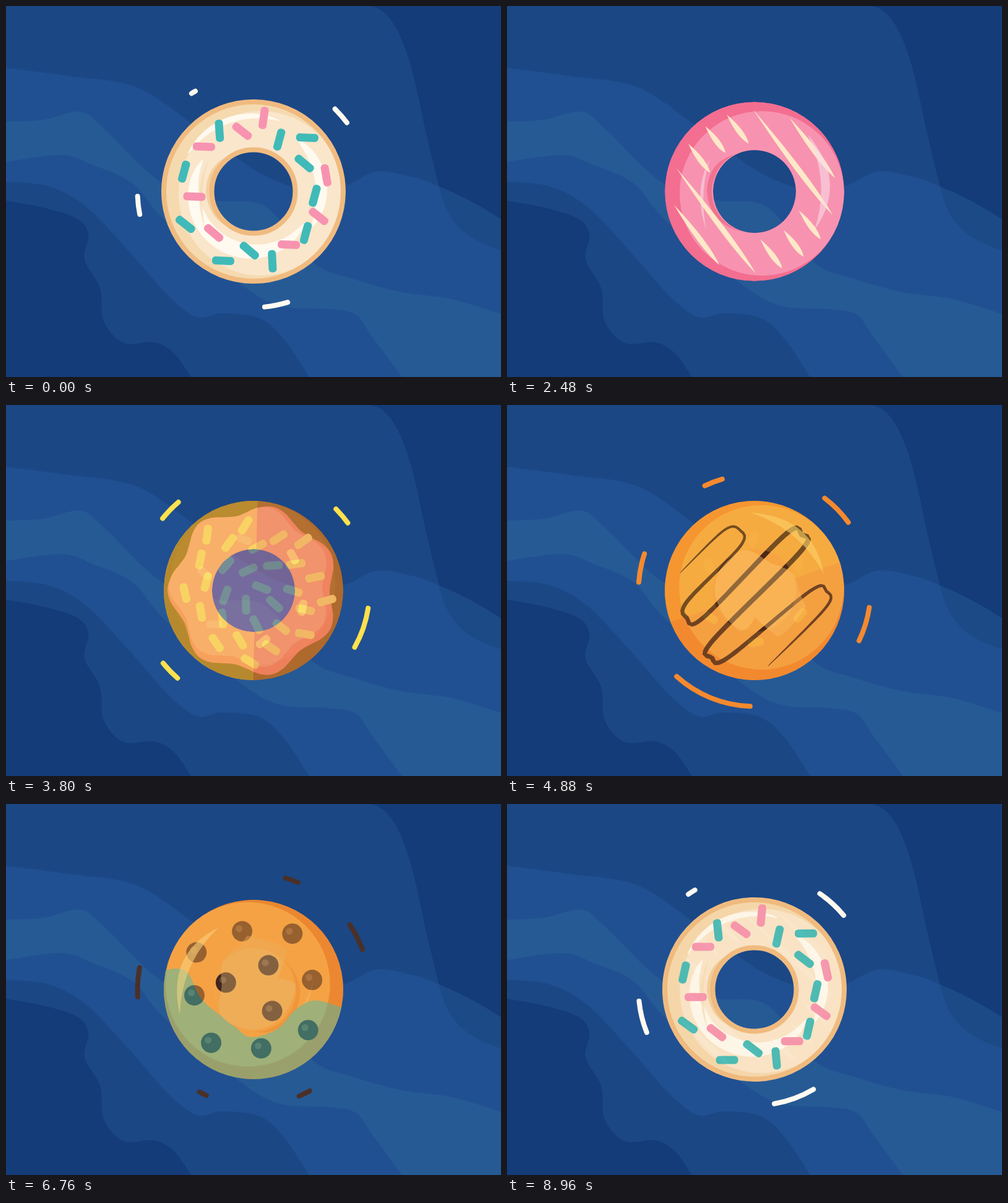
Recreate the animation shown at these times as an HTML page. Size 800 by 600 pixels, loop 9 s.

```html
<!DOCTYPE html>
<html lang="en">
<head>
<meta charset="utf-8">
<title>Donuts</title>
<style>
html, body { margin: 0; width: 100%; height: 100%; overflow: hidden; background: #1b4785; }
svg { display: block; width: 800px; height: 600px; }
</style>
</head>
<body>
<svg viewBox="0 0 800 600">
  <defs><clipPath id="ring"><path clip-rule="evenodd" d="M255 300a145 145 0 1 0 290 0a145 145 0 1 0 -290 0M333 300a67 67 0 1 0 134 0a67 67 0 1 0 -134 0"/></clipPath></defs>
  <g id="back"></g>
  <g id="stage"></g>
  <path id="arcs" fill="none" stroke-width="8" stroke-linecap="round"/>
</svg>
<script>
const $ = id => document.getElementById(id);
const range = (n, f) => Array.from({ length: n }, (_, i) => f(i));
const polar = (r, deg, cx = 400, cy = 300) => {
  const a = deg * Math.PI / 180;
  return [cx + r * Math.cos(a), cy + r * Math.sin(a)];
};

// Smooth path through points, given as pairs or as a flat list.
function curve(points, closed) {
  const flat = points.flat(), n = flat.length / 2;
  const at = i => {
    i = closed ? (i + n) % n : Math.max(0, Math.min(n - 1, i));
    return [flat[2 * i], flat[2 * i + 1]];
  };
  let d = 'M' + at(0);
  for (let i = 0; i < (closed ? n : n - 1); i++) {
    const [a, b, c, e] = [at(i - 1), at(i), at(i + 1), at(i + 2)];
    const c1 = b.map((v, j) => v + (c[j] - a[j]) / 6);
    const c2 = c.map((v, j) => v - (e[j] - b[j]) / 6);
    d += `C${c1} ${c2} ${c}`;
  }
  return d + (closed ? 'Z' : '');
}

const path = (d, fill, opacity = 1) => `<path d="${d}" fill="${fill}" opacity="${opacity}"/>`;
const circle = (x, y, r, fill, more = '') => `<circle cx="${x}" cy="${y}" r="${r}" fill="${fill}" ${more}/>`;
const hoop = (r, w, color) => circle(400, 300, r, 'none', `stroke="${color}" stroke-width="${w}"`);
const turn = (deg, inner) => `<g transform="rotate(${deg} 400 300)">${inner}</g>`;
const inRing = inner => `<g clip-path="url(#ring)">${inner}</g>`;

// Dough with a crescent of shade along its left side.
const disc = (fill, shade) => circle(400, 300, 145, shade) + circle(412, 303, 133, fill);
const ring = (fill, shade) => inRing(disc(fill, shade));
const rim = (dark, light) =>
  path('M368 240Q325 252 323 300Q328 355 382 365A67 67 0 0 1 368 240Z', dark) +
  path('M328 248Q300 298 322 362Q310 300 328 248Z', light, .65);
const shine = (color, opacity = .6) => path('M486 208Q552 285 497 362Q523 285 486 208Z', color, opacity);
const glow = (color, opacity) => path('M340 335C325 270 360 235 400 235C442 228 438 262 450 285C482 328 454 330 450 372Q400 388 383 382Q376 360 374 334Q350 346 340 335Z', color, opacity);

// Line that thins out toward both ends.
function taper(points, width, power, color) {
  const line = document.createElementNS('http://www.w3.org/2000/svg', 'path');
  line.setAttribute('d', curve(points));
  const len = line.getTotalLength(), steps = 260, left = [], right = [];
  for (let i = 0; i <= steps; i++) {
    const s = i / steps, p = line.getPointAtLength(s * len);
    const a = line.getPointAtLength(s * len - 1), b = line.getPointAtLength(s * len + 1);
    const w = (.6 + width * Math.sin(Math.PI * s) ** power) / 2 / (Math.hypot(b.x - a.x, b.y - a.y) || 1);
    const dx = (a.y - b.y) * w, dy = (b.x - a.x) * w;
    left.push([p.x + dx, p.y + dy]);
    right.unshift([p.x - dx, p.y - dy]);
  }
  return path('M' + left.concat(right).join('L') + 'Z', color);
}
const swoosh = (r, from, to, width) =>
  taper(range(13, i => polar(r, from + (to - from) * i / 12)), width, .7, '#fffaf0');

const sprinkle = ([x, y], tilt, color, l = 36, w = 13) =>
  `<rect x="${-l / 2}" y="${-w / 2}" width="${l}" height="${w}" rx="5.5" fill="${color}" transform="translate(${x} ${y}) rotate(${tilt})"/>`;

// Sprinkles around the ring, alternating nearer and farther from the hole.
const tilts = [2, 86, 38, 98, 105, 2, 40, 80, 105, 38, 105, 2, 87, 40, 2, 40, 38, 2, 105];
const wreath = () => tilts.map((tilt, i) => {
  const angle = 18.56 * i - 138 - 10 * Math.max(0, Math.sin((i - 5) * .24));
  const r = 108 - 15 * (-1) ** i * Math.sin(i * Math.PI / 10);
  const isPink = i < 3 ? i % 2 === 0 : i % 2 && i % 8 !== 5;
  return sprinkle(polar(r, angle), tilt, isPink ? pink : teal);
}).join('');

const scatter = (n, color) => range(n, i =>
  sprinkle(polar(22 * Math.sqrt(i + .4), 137.5 * i - 21), 20 + i * 67, color, 32)).join('');

// Scalloped icing with seven lobes.
const icing = (r, x, y, color) =>
  path(curve(range(42, i => polar(r + 8 * Math.cos(i * Math.PI / 3), i * 360 / 42 - 78, x, y)), true), color);

// Evenly spaced parallel stripes cut to the ring, widest near their lower end.
function stripes(color) {
  const drop = (a, b, y) => {
    const m = a + (b - a) * .68;
    return `M${a} ${y}Q${m} ${y + 9} ${b} ${y}Q${m} ${y - 9} ${a} ${y}`;
  };
  const d = range(7, i => {
    const y = 39 * (i - 3), outer = Math.sqrt(132 ** 2 - y * y);
    if (Math.abs(y) > 70) return drop(-outer, outer, y);
    const inner = Math.sqrt(78 ** 2 - y * y);
    return drop(-outer, -inner, y) + drop(inner, outer, y);
  }).join('');
  return `<g transform="translate(400 300) rotate(53)">${path(d, color)}</g>`;
}

const swirl = () => taper(range(32, i => {
  const quarter = i * .3 - .4;
  return polar(17 + 12 * quarter, -90 * quarter, 401, 310);
}), 7.5, .8, brown);

// Back-and-forth line with round bends at the given centres.
function zigzag(start, bends, end) {
  const r = 13;
  const points = bends.flatMap(([x, y], i) => {
    const side = i % 2 ? -r : r;
    return [[x - r, y - r], [x + side, y - side], [x + r, y + r]];
  });
  return taper([start, ...points, end], 7.5, .6, brown);
}

const chip = ([x, y]) => circle(x, y, 16.5, '#41251f') + circle(x - 5, y - 4, 5.5, '#6b4a3c');
const chips = () => [
  ...range(8, i => polar(103 + 7 * (-1) ** i, -148 + 45.9 * i)),
  ...range(3, i => polar(46, 193 + 107.5 * i))
].map(chip).join('');

const brown = '#4a2818', cream = '#fde8c8', teal = '#40bab8', pink = '#f793b0';

const donuts = [
  { arc: '#fffaf0', art: turn(7.8,
    ring('#fae6cb', '#f5dab0') + swoosh(97, 212, 32, 25) + swoosh(110, -50, 32, 18) + swoosh(122, -150, -70, 9) +
    rim('#f3d09f', '#f5dab0') + hoop(145, 8, '#f0bb80') + hoop(67.5, 8, '#f0bb80') + wreath()) },
  { arc: '#5cded6', art: disc(teal, '#2fa398') + swirl() + glow('#68e6e2', .6) + shine('#6feae4') },
  { arc: pink, art: ring(pink, '#f36e90') + rim('#f0738f', '#fbd3e2') + stripes(cream) + shine('#fbdcea') },
  { arc: '#f36e90', art: disc('#5b3a1c', '#54351a') + turn(109,
    icing(131, 400, 300, '#f36e90') + icing(124, 395, 294, pink) + scatter(30, '#f6ee9e')) },
  { arc: '#ffe14d', art: ring('#ee9440', '#ea8c38') + turn(109,
    inRing('<rect x="240" y="140" width="163" height="320" fill="#fac23c"/>') +
    range(6, i => sprinkle(polar(84, 60 * i - 102), 40 * i + 20, '#fbd548', 26)).join('')) },
  { arc: '#f6892d', art: disc('#f6a442', '#f6892d') +
    turn(39, zigzag([279, 273], [[363, 216], [304, 332], [462, 222], [345, 396], [503, 313]], [423, 422])) +
    glow('#fcc870', .4) + turn(-7, shine('#fcd978')) },
  { arc: '#45bfae', art: ring('#f5a142', '#ee8a30') + rim('#e8892f', '#fcc870') + turn(153, inRing(path(
    curve([250, 272, 290, 272, 317, 318, 366, 356, 396, 377, 440, 363, 468, 332, 500, 316, 548, 328]) + 'V450H250Z', '#45bfae'))) +
    shine('#fcd978', .5) },
  { arc: '#4a3028', art: disc('#f4a347', '#ea8530') + turn(153, chips()) + glow('#e6bb70', .4) + shine('#fcd488') },
  { arc: '#f2c27a', art: ring('#f2c27a', '#e9b066') + rim('#e2a658', '#fbe3b4') + stripes(cream) + shine('#fbe3b4') }
];

// Each burst: start angle and sweep in degrees.
const bursts = {
  A: [[-94, 58], [10, 75], [120, 58], [-134, 14]],
  B: [[-45, 28], [-142, 35], [130.5, 32], [8, 64]],
  C: [[-63, 40], [-121, 22], [-184.5, 34], [-2, 41], [68, 95]],
  D: [[-74, 36], [-34, 76], [176.3, 80], [114, 21], [61, 32]]
};
const burstOrder = 'ACBDBCADB';

// Wavy layers, each an upper edge filled down to the bottom of the stage.
const layer = (edge, color) => path(curve(edge) + 'V600H0Z', color);
$('back').innerHTML =
  layer([0, 100, 100, 113, 210, 131, 300, 190, 355, 232, 410, 270, 465, 293, 505, 297, 550, 290, 598, 268, 650, 275, 700, 292, 800, 345], '#205092') +
  layer([0, 187, 60, 184, 120, 171, 160, 200, 250, 285, 335, 314, 420, 325, 495, 414, 560, 441, 640, 463, 720, 474, 800, 498], '#265a95') +
  layer([0, 252, 90, 241, 140, 257, 205, 287, 255, 345, 370, 443, 440, 484, 520, 490, 565, 499, 592, 535, 640, 600], '#205092') +
  layer([0, 284, 70, 292, 130, 325, 200, 398, 260, 466, 308, 503, 350, 497, 410, 505, 450, 540, 490, 600], '#1b4785') +
  layer([0, 315, 60, 326, 115, 344, 133, 370, 127, 410, 152, 456, 158, 510, 190, 545, 240, 544, 272, 562, 299, 600], '#133c79') +
  path('M585 0C645 0 665 145 680 210Q692 262 700 292Q750 312 800 345V0Z', '#133c79') +
  path('M700 292C712 345 735 375 800 395V345Q750 312 700 292Z', '#1c4a87');

const stage = $('stage'), arcs = $('arcs');
stage.innerHTML = donuts.map(d => `<g>${d.art}</g>`).join('');
const groups = [...stage.children];

const clamp = v => Math.max(0, Math.min(1, v));
const swing = v => (1 - Math.cos(Math.PI * clamp(v))) / 2;

// Quick full spin with a slow settling tail; p runs from .5 to 1.5.
function spin(p) {
  const v = clamp((p - .5) / .85);
  return -320 * (1 - swing((p - .5) / .46)) - 40 * (1 - v) ** 3 * (1 + 3 * v);
}

function draw(now) {
  const s = now % 9000 / 1000 + .5;
  const next = Math.floor(s) % 9, last = (next + 8) % 9;
  const f = s % 1, p = f + .5, fade = Math.max(0, 1 - 2 * f);

  groups.forEach((g, i) => g.style.display = i === next || (i === last && fade) ? '' : 'none');
  groups[next].setAttribute('opacity', 1);
  groups[last].setAttribute('opacity', fade);
  stage.append(groups[next], groups[last]);
  stage.setAttribute('transform', `rotate(${spin(p)} 400 300)`);

  const head = swing((p - .66) / .36), tail = swing((p - .78) / .3);
  arcs.setAttribute('stroke', donuts[next].arc);
  arcs.setAttribute('d', head - tail < .005 ? '' : bursts[burstOrder[next]].map(([a, sweep]) =>
    `M${polar(187.5, a + sweep * tail)}A187.5 187.5 0 0 1 ${polar(187.5, a + sweep * head)}`).join(''));
}

const start = performance.now();
function tick() {
  draw(performance.now() - start);
  requestAnimationFrame(tick);
}
tick();
</script>
</body>
</html>
```
